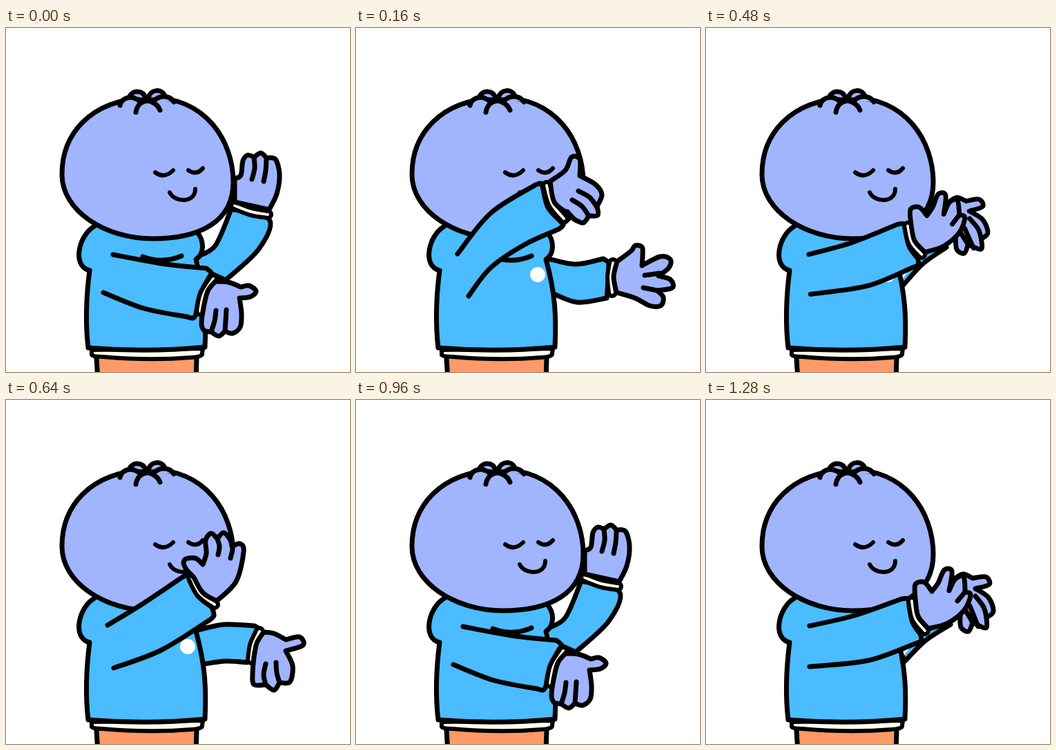
Write an HTML page that moves like this. It is 498 by 498 pixels and loops after 1440 ms.

```html
<!DOCTYPE html>
<html lang="en">
<head>
<meta charset="utf-8">
<title>Clapping</title>
<style>
html, body { margin: 0; width: 100%; height: 100%; overflow: hidden; background: #fff; }
svg { display: block; width: 100%; height: 100%; }
path { stroke: #000; stroke-width: 7; stroke-linecap: round; stroke-linejoin: round; fill: none; }
.skin { fill: #a1b5ff; }
.shirt { fill: #4abcff; }
.trim { fill: #fffdf0; stroke-width: 6; }
.pants { fill: #ff9966; }
.face { stroke-width: 6; }
.cuff { stroke-width: 16; }
.band { stroke: #fffdf0; stroke-width: 4; }
</style>
</head>
<body>
<svg viewBox="0 0 498 498">
  <g id="far"></g>
  <g id="body">
    <path class="pants" d="M131 478L133 510H275L276 478"/>
    <path class="trim" d="M124 466V473Q126 476 140 476Q208 482 268 477Q285 476 284 471L285 464Z"/>
    <path class="shirt" d="M128 287C105 300 95 345 121 351C116 390 115 430 119 463Q205 470 288 462C290 420 289 385 275 335C287 327 288 308 276 295"/>
    <path d="M198 331Q226 342 254 330"/>
    <circle cx="263" cy="357" r="11" fill="#fff"/>
  </g>
  <g id="head">
    <path class="skin" d="M81 212C81 155 120 104 205 101S329 165 329 223S280 305 212 305S81 265 81 212Z"/>
    <path class="skin" d="M179 99C183 90 198 89 202 101M206 101C210 87 227 88 230 99"/>
    <path class="skin" d="M165 112C167 102 179 98 187 102Q193 104 196 109M215 105C222 97 237 97 243 107"/>
    <path class="skin" d="M188 122C190 108 202 103 211 107Q220 111 223 119"/>
    <path class="face" d="M216 209Q229 219 242 206M264 206Q276 214 285 203"/>
    <path class="face" d="M237 238C244 253 274 254 274 233"/>
  </g>
  <g id="near"></g>
</svg>
<script>
// Smooth curve through points, without its starting move
function curve(pts) {
  let d = "";
  for (let i = 0; i < pts.length - 1; i++) {
    const a = pts[i], b = pts[i + 1];
    const before = pts[i - 1] || a, after = pts[i + 2] || b;
    const c1 = a.map((v, k) => v + (b[k] - before[k]) / 6);
    const c2 = b.map((v, k) => v - (after[k] - a[k]) / 6);
    d += `C${c1} ${c2} ${b}`;
  }
  return d;
}

// "x,y x,y / x,y": a slash makes the point before it a corner; "|" starts a new line
function outline(text) {
  return text.split("|").map(line => {
    let last = null, d = "";
    for (const part of line.split("/")) {
      const pts = part.trim().split(" ").map(p => p.split(",").map(Number));
      d += last ? curve([last, ...pts]) : `M${pts[0]}` + curve(pts);
      last = pts[pts.length - 1];
    }
    return d;
  }).join("");
}

const shape = (name, d) => `<path class="${name}" d="${d}"/>`;

function arm(sleeve, cuff, hand, creases) {
  const rim = cuff && outline(cuff);
  return shape("shirt", outline(sleeve)) +
    (cuff ? shape("cuff", rim) + shape("band", rim) : "") +
    shape("skin", outline(hand) + "Z") +
    shape("crease", outline(creases));
}

const openFar = arm(
  "276,331 303,315 326,262 / 381,277 366,320 318,365 / 285,350",
  "331,257 355,266 379,270",
  "331,218 340,213 343,192 350,184 359,187 / 369,181 377,188 / 390,190 396,212 392,240 381,263 / 331,252",
  "359,187 360,203 356,219|377,189 376,206 373,222");

const openNear = arm(
  "155,328 225,341 290,348 / 297,354 294,361 / 281,385 275,414 / 271,420 262,418 / 200,406 141,383",
  "300,363 286,386 281,410",
  "303,367 322,368 340,375 / 352,373 362,381 354,389 338,391 / 341,414 339,433 328,442 317,439 / 308,446 297,440 / 287,438 283,428 286,405 292,381 303,367",
  "304,409 302,424 297,440|319,408 318,424 317,439");

const highFar = arm(
  "278,334 318,342 358,334 / 366,339 / 365,364 363,391 / 320,397 280,382",
  "372,340 369,361 371,383",
  "378,338 398,323 404,315 414,317 415,328 414,344 / 440,331 455,335 453,347 438,359 / 455,364 458,376 436,380 / 445,390 441,402 425,402 404,391 377,383 / 373,360 378,338",
  "418,358 440,355|416,376 436,380");

const highNear = arm(
  "147,327 195,268 260,227 / 268,225 271,234 / 278,260 296,280 / 300,285 294,291 / 245,313 195,347 163,388",
  "276,228 284,255 301,276",
  "281,222 303,206 312,187 324,190 324,214 / 346,226 356,241 349,258 / 350,271 337,272 / 329,282 316,277 / 306,268 / 287,252 281,222",
  "322,236 338,245 348,258|313,249 327,258 337,272|306,266 316,277");

const closingFar = arm(
  "270,345 293,317 312,276 / 328,297 348,309 / 348,318 344,326 / 335,345",
  "319,273 330,291 350,305",
  "322,267 342,249 372,247 400,261 406,274 401,282 / 405,292 394,299 / 390,311 374,311 354,301 / 333,285 322,267",
  "342,273 352,279 368,288 393,299|361,257 374,270 372,285|376,268 401,282");

const closingNear = arm(
  "155,328 230,335 303,336 / 311,341 308,350 / 306,378 304,404 / 301,411 294,411 / 215,404 144,386",
  "315,350 313,374 314,397",
  "322,351 328,338 339,329 348,340 346,355 / 376,341 389,345 378,361 / 393,361 396,371 383,383 / 389,391 380,402 350,403 322,397 / 318,374 322,351",
  "362,367 380,358|363,385 385,382");

const lowFar = arm(
  "275,334 315,325 360,327 / 366,331 / 357,352 352,376 / 349,380 / 318,378 288,382",
  "367,335 358,355 355,376",
  "373,336 388,338 405,347 / 425,343 430,355 405,363 / 415,385 411,408 396,409 / 388,420 376,412 / 359,412 357,395 359,372 / 363,352 373,336",
  "376,382 373,398 376,412|391,380 392,395 396,409");

const lowNear = arm(
  "147,326 198,295 256,256 / 264,254 266,262 / 278,284 298,300 / 301,312 294,319 / 225,362 156,388",
  "269,257 281,280 302,296",
  "272,257 259,242 259,231 274,229 285,238 / 290,222 289,203 297,193 306,201 / 315,192 325,203 327,212 / 339,208 344,220 333,263 305,291 / 285,279 272,257",
  "306,201 309,212 307,224|325,203 328,215 325,229");

const clapFar = arm(
  "285,372 288,378 / 318,348 354,325 / 320,325",
  "",
  "358,260 372,252 386,258 / 405,256 410,267 390,273 / 409,286 416,306 406,315 / 405,330 386,322 / 380,335 369,329 368,310 / 350,290",
  "390,284 402,300 406,315|382,298 394,328|376,305 386,322");

const clapNear = arm(
  "150,327 215,312 283,288 / 292,288 294,298 / 299,322 311,340 / 311,349 302,353 / 235,377 150,386",
  "298,291 303,316 317,334",
  "303,288 303,267 316,264 327,277 / 336,265 345,246 356,248 352,276 / 361,259 373,256 375,278 / 383,282 374,304 350,323 322,331 / 307,313 303,288",
  "375,278 364,291");

const pose = (far, near, move = "") => ({ far, near, move });
const open = pose(openFar, openNear);
const high = pose(highFar, highNear);
const closing = pose(closingFar, closingNear);
const low = pose(lowFar, lowNear);
const clap = pose(clapFar, clapNear);
// Same clap, swung slightly up
const clapHigh = pose(clapFar, clapNear, "translate(152 355) rotate(-2.4) scale(.978) translate(-152 -355)");

const BEAT = 160;
const beats = [open, high, closing, clapHigh, low, clap, open, high, clap];
const layers = { far: document.getElementById("far"), near: document.getElementById("near") };

let shown = null;
function update(time) {
  const next = beats[Math.floor(time / BEAT) % beats.length];
  if (next === shown) return;
  shown = next;
  for (const side of ["far", "near"]) {
    layers[side].innerHTML = next[side];
    layers[side].setAttribute("transform", next.move);
  }
}

const start = performance.now();
function tick() {
  update(performance.now() - start);
  requestAnimationFrame(tick);
}
tick();
</script>
</body>
</html>
```
